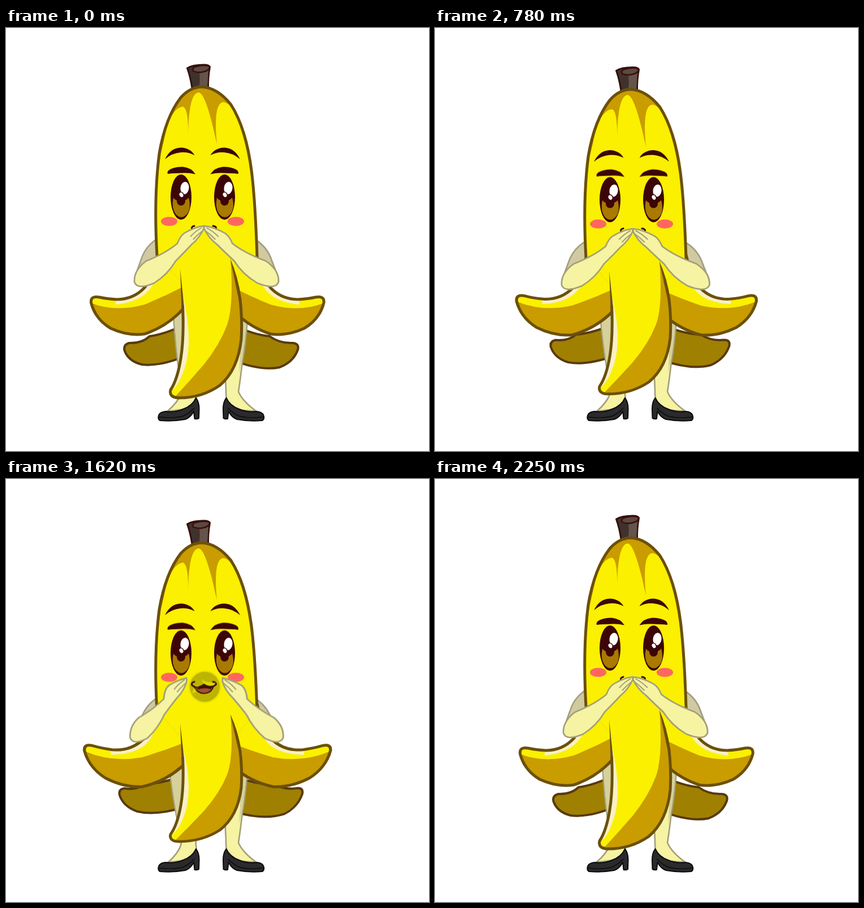
These frames come from a looping animation (748 by 748 pixels, 2280 ms). An HTML page without scripts:

```html
<!DOCTYPE html>
<html lang="en">
<head>
<meta charset="utf-8">
<title>Banana</title>
<style>
@property --p { syntax: '<number>'; inherits: true; initial-value: 0; }
html, body { margin: 0; width: 100%; height: 100%; overflow: hidden; background: #fff; }
svg { display: block; width: 100vw; height: 100vh; animation: squash 2280ms infinite; }

/* --p is the squash: 0 standing tall, 1 fully pressed down */
@keyframes squash {
  0% { --p: 0; animation-timing-function: steps(1); }
  2.63% { --p: .12; animation-timing-function: steps(7); }
  19.74% { --p: .88; animation-timing-function: steps(2); }
  25% { --p: 1; animation-timing-function: steps(4); }
  34.21% { --p: .46; animation-timing-function: steps(6); }
  50% { --p: 0; animation-timing-function: steps(1); }
  51.32% { --p: .1; animation-timing-function: steps(5); }
  64.47% { --p: .73; animation-timing-function: steps(4); }
  73.68% { --p: 1; animation-timing-function: steps(1); }
  76.32% { --p: .9; animation-timing-function: steps(2); }
  81.58% { --p: .7; animation-timing-function: steps(6); }
  97.37% { --p: .06; animation-timing-function: steps(1); }
  98.68%, 100% { --p: 0; }
}
.head { transform: translateY(calc(var(--p) * 10px)); }
.front { transform: translateY(500px) scaleY(calc(1 - var(--p) * .097)) translateY(-500px); }
.side { transform: matrix(calc(1 + var(--p) * .085), calc(var(--p) * .105), 0, 1, calc(var(--p) * -26.4), calc(var(--p) * -22)); }
.back { transform: matrix(1, calc(var(--p) * .14), 0, 1, calc(var(--p) * -10), calc(var(--p) * -42)); }
.backr { transform: matrix(1, calc(var(--p) * -.14), 0, 1, calc(var(--p) * 9), calc(var(--p) * 59)); }
.leg { transform: translateY(650px) skewX(calc(var(--p) * 3.6deg)) translateY(-650px); }
.arms { transform: translate(350px, calc(var(--p) * 11px)) scaleX(calc(1 + var(--p) * .056)) translateX(-350px); }

.fore, .upper, .fingers, .open, .lid, .laugh, .ring { animation: 2280ms linear infinite; }
.fore { animation-name: fore; }
.upper { animation-name: upper; }
.fingers { animation-name: fingers; }
.open { animation-name: blink; animation-timing-function: steps(1); }
.lid { animation-name: lid; animation-timing-function: steps(1); }
.laugh { animation-name: laugh; animation-timing-function: steps(1); }
.ring { animation-name: ring; opacity: 0; }
@keyframes fore {
  0%, 68.42%, 97.37%, 100% { d: path("M349 350 Q333 352 315 363 Q308 368 303 381 Q283 398 248 412 Q226 428 227 449 Q232 464 262 451 Q286 436 300 412 Q316 396 328 383 Q342 372 350 354 Z"); }
  73.68%, 90.79% { d: path("M293 335 Q281 339 269 347 Q260 354 262 378 Q247 398 232 413 Q222 428 224 447 Q230 460 247 447 Q260 426 267 402 Q272 388 282 372 Q292 358 293 342 Z"); }
}
@keyframes upper {
  0%, 68.42%, 97.37%, 100% { d: path("M272 370 Q246 384 238 412 L228 440 Q240 440 250 430 L290 400 L275 370 Z"); }
  73.68%, 90.79% { d: path("M272 384 Q264 390 254 404 L240 430 Q250 435 255 425 L290 400 L275 384 Z"); }
}
@keyframes fingers {
  0%, 68.42%, 97.37%, 100% { d: path("M346 353 Q334 360 326 369 M347 359 Q338 366 331 374"); }
  73.68%, 90.79% { d: path("M290 338 Q280 346 274 357 M292 344 Q285 352 279 361"); }
}
@keyframes blink {
  0%, 100% { visibility: visible; }
  72.37% { visibility: hidden; }
  93.42% { visibility: visible; }
}
@keyframes laugh {
  0%, 100% { visibility: hidden; }
  70% { visibility: visible; }
  95% { visibility: hidden; }
}
@keyframes lid {
  0%, 100% { transform: none; }
  72.37% { transform: translateY(65px); }
  93.42% { transform: none; }
}
@keyframes ring {
  0%, 63.1% { opacity: 0; transform: translate(352px, 367px) scale(.36); }
  63.2% { opacity: .42; transform: translate(352px, 367px) scale(.36); }
  64.47% { opacity: .4; transform: translate(352px, 367px) scale(.4); }
  81.58% { opacity: .16; transform: translate(350.5px, 368px) scale(1); }
  89%, 100% { opacity: 0; transform: translate(350.5px, 368px) scale(1.25); }
}

.line { fill: none; stroke: #6b500b; stroke-width: 5; stroke-linecap: round; stroke-linejoin: round; }
.yellow { fill: #faf000; }
.brown { fill: #c99c00; }
.cream { fill: #f8f0c6; }
.dark { fill: #3d0505; }
.skin { fill: #f6f3a3; stroke: #a39f78; stroke-width: 2.6; stroke-linejoin: round; }
.shade { fill: #d1caa0; stroke: #a39f80; stroke-width: 2.6; }
.under { fill: #a08000; stroke: #573a10; stroke-width: 4; stroke-linejoin: round; }
.fingers { fill: none; stroke: #a39f78; stroke-width: 2; }
</style>
</head>
<body>
<svg viewBox="0 0 748 748">
  <defs>
    <path id="sideEdge" d="M272 390 Q264 430 246 458 Q226 480 196 480 Q178 479 165 476 Q149 473 150.500 486 Q158 515 185 531 Q215 545 245 541 Q285 528 314 496"/>
    <g id="side">
      <path class="yellow" d="M272 390 Q264 430 246 458 Q226 480 196 480 Q178 479 165 476 Q149 473 150.500 486 Q158 515 185 531 Q215 545 245 541 Q285 528 314 496 L356 480 V390 Z"/>
      <path class="brown" d="M152 487 Q195 503 245 489 Q282 474 316 456 V496 Q285 528 245 541 Q215 545 185 531 Q158 515 152 487 Z"/>
      <path class="cream" d="M268 416 Q268 482 194 489 V480 Q226 480 246 458 Z"/>
      <use href="#sideEdge" class="line"/>
    </g>
    <g id="shoe" stroke="#0b0b0c" stroke-width="2" stroke-linejoin="round">
      <path fill="#2a2a2d" d="M270 685 Q272 679 282 678 Q300 680 313 674 Q330 668 336 654 Q342 662 341.500 675 L341 690 Q338 692 333.500 691 L332 678 Q326 689 317 692 Q296 696 272 694 Q268 691 270 685 Z"/>
      <path fill="none" stroke-width="1.500" d="M271 688 Q298 691 314 686 Q326 680 333 672"/>
    </g>
    <g id="eye">
      <ellipse class="dark" cx="309.500" cy="299" rx="18.500" ry="40"/>
      <path fill="#a87a00" d="M296 300 Q300 306 309 306 Q318 306 323 300 Q328 319 320 329 Q310 340 300 329 Q292 318 296 300 Z"/>
      <ellipse class="dark" cx="309.500" cy="306" rx="7.500" ry="8"/>
      <ellipse cx="316" cy="283" rx="7.500" ry="11" fill="#fff" transform="rotate(8 316 283)"/>
      <ellipse cx="310" cy="295" rx="4" ry="5" fill="#fff" stroke="#3d0505" stroke-width="1.500" transform="rotate(-25 310 295)"/>
    </g>
    <path id="brow" class="dark" d="M281 232 Q291 212 309 211.500 Q326 212 333.500 225 Q322 219 309 220 Q294 221 281 232 Z"/>
    <path id="lid" class="dark" d="M286 258 Q284 253 291 249.500 Q301 245 313 245.500 Q328 247 335 258.500 Q322 255.500 310 256.500 Q296 256.500 286 258 Z"/>
  </defs>

  <path class="under back" d="M322 522 Q280 542 254 545 Q240 558 218 557 Q207 560 209.500 570 Q216 589 240 595 Q274 599 322 578 Z"/>
  <path class="under backr" d="M400 525 Q440 543 466 545 Q484 558 507 557 Q519 558 516 569 Q508 591 484 600 Q450 607 400 587 Z"/>

  <g class="leg">
    <path class="skin" d="M295 490 Q299 560 305 600 Q308 628 310 646 Q304 662 285 678 L330 672 Q338 660 336 648 L344 490 Z"/>
    <path fill="#d6d09b" d="M296.500 490 Q300 560 306 600 L318 600 V490 Z"/>
  </g>
  <path class="skin" d="M428 500 Q424 560 418 590 Q414 625 411 643 Q418 660 443 678 L398 674 Q388 662 389 640 L382 500 Z"/>
  <path fill="#d6d09b" d="M427 500 Q423 560 416 590 L412 612 Q416 550 415 500 Z"/>
  <use href="#shoe"/>
  <use href="#shoe" transform="matrix(-1 0 0 1 725.500 0)"/>

  <g class="arms">
    <path class="shade upper"/>
    <g transform="matrix(-1.074 0 0 1 725.800 0)"><path class="shade upper"/></g>
  </g>

  <g class="side"><use href="#side"/></g>
  <g transform="matrix(-1 0 0 1 712.500 0)"><g class="side"><use href="#side"/></g></g>

  <g class="head">
    <path fill="#3f322c" stroke="#35100f" stroke-width="3" stroke-linejoin="round" d="M320.500 71 Q330 65 350 65 Q359 65 360.500 69 Q357 88 357.500 106 L329 106 Q326 86 320.500 71 Z"/>
    <path fill="#65544a" d="M342 80 Q352 79 358 74 L356 105 H341 Q344 94 342 80 Z"/>
    <path fill="#5c4a41" stroke="#3b0d0d" stroke-width="2.500" d="M331 76 Q328 70 337 68 Q352 64 360 68 Q360 76 346 78 Q336 79 331 76 Z"/>
    <path class="brown" d="M267 400 Q261 300 271 222 Q282 158 309 123 Q326 104 347 104 Q374 106 397.500 135 Q425 178 434.500 255 Q441 310 444 402 L400 452 H312 Z"/>
    <path class="yellow" d="M267 400 Q261 300 274 222 L280 196 Q290 142 313 139 Q323 143 322 191 Q323 114 341 114 Q354 116 373 206 Q366 133 384 131 Q402 132 417 184 Q431 230 437 300 Q441 340 444 402 L400 452 H312 Z"/>
    <path class="line" d="M267 402 Q261 300 271 222 Q282 158 309 123 Q326 104 347 104 Q374 106 397.500 135 Q425 178 434.500 255 Q441 310 444 404"/>
  </g>

  <g class="front">
    <path class="yellow" d="M308 428 Q318 540 309 585 Q303 622 291 640 Q288 652 303 654 Q345 655 378 632 Q410 605 416 550 Q422 480 397 410 L380 400 H320 Z"/>
    <path class="cream" d="M312 470 Q334 560 312 612 Q306 628 296 639 L292 640 Q303 622 309 585 Q315 540 312 470 Z"/>
    <path class="brown" d="M397 410 Q403 490 391 525 Q378 560 350 595 Q325 624 299 652 Q345 655 378 632 Q410 605 416 550 Q422 480 397 410 Z"/>
    <path class="line" d="M312.500 492 Q315 548 309 585 Q303 622 291 640 Q288 652 303 654 Q345 655 378 632 Q410 605 416 550 Q418 515 414 480"/>
    <path fill="#6b500b" d="M308 426 L310.500 494 H315 Z M396.500 408 L412 482 L416.500 480 Q410 438 396.500 408 Z"/>
  </g>

  <g class="head">
    <use href="#brow"/>
    <use href="#brow" transform="matrix(-1 0 0 1 695 0)"/>
    <g class="lid">
      <use href="#lid"/>
      <use href="#lid" transform="matrix(-1 0 0 1 696.500 0)"/>
    </g>
    <g class="open">
      <use href="#eye"/>
      <use href="#eye" x="77"/>
    </g>
    <g fill="#ff6660">
      <ellipse cx="288.500" cy="342" rx="14.500" ry="8"/>
      <ellipse cx="406.500" cy="342" rx="14.500" ry="8"/>
    </g>
    <g class="laugh">
      <path fill="#d9603c" stroke="#3d0505" stroke-width="2" d="M333 359 Q342 360 350 355 Q358 360 367 358 Q363 370 350 370.500 Q338 370 333 359 Z"/>
      <path class="dark" d="M335 360 Q342 360 350 356 Q358 360 365 359 L362 363 Q350 359 338 364 Z"/>
    </g>
    <path fill="none" stroke="#3d0505" stroke-width="3" stroke-linecap="round" d="M333 350 Q327 351 329 356 Q338 364 350 355 Q362 363 371 355 Q373 351 366 350"/>
  </g>

  <g class="arms">
    <path class="skin fore"/>
    <path class="fingers"/>
    <g transform="matrix(-1.074 0 0 1 725.800 0)">
      <path class="skin fore"/>
      <path class="fingers"/>
    </g>
  </g>

  <g class="ring">
    <circle r="46" fill="#343008" opacity=".2"/>
    <circle r="42" fill="#343008"/>
    <path fill="#fbf100" opacity=".55" d="M-8 -22 Q6 -8 36 -14 Q24 2 4 -6 Q-8 -10 -8 -22 Z M-35 14 Q-26 -6 -16 -4 Q-18 14 -32 18 Z"/>
  </g>
</svg>
</body>
</html>
```
